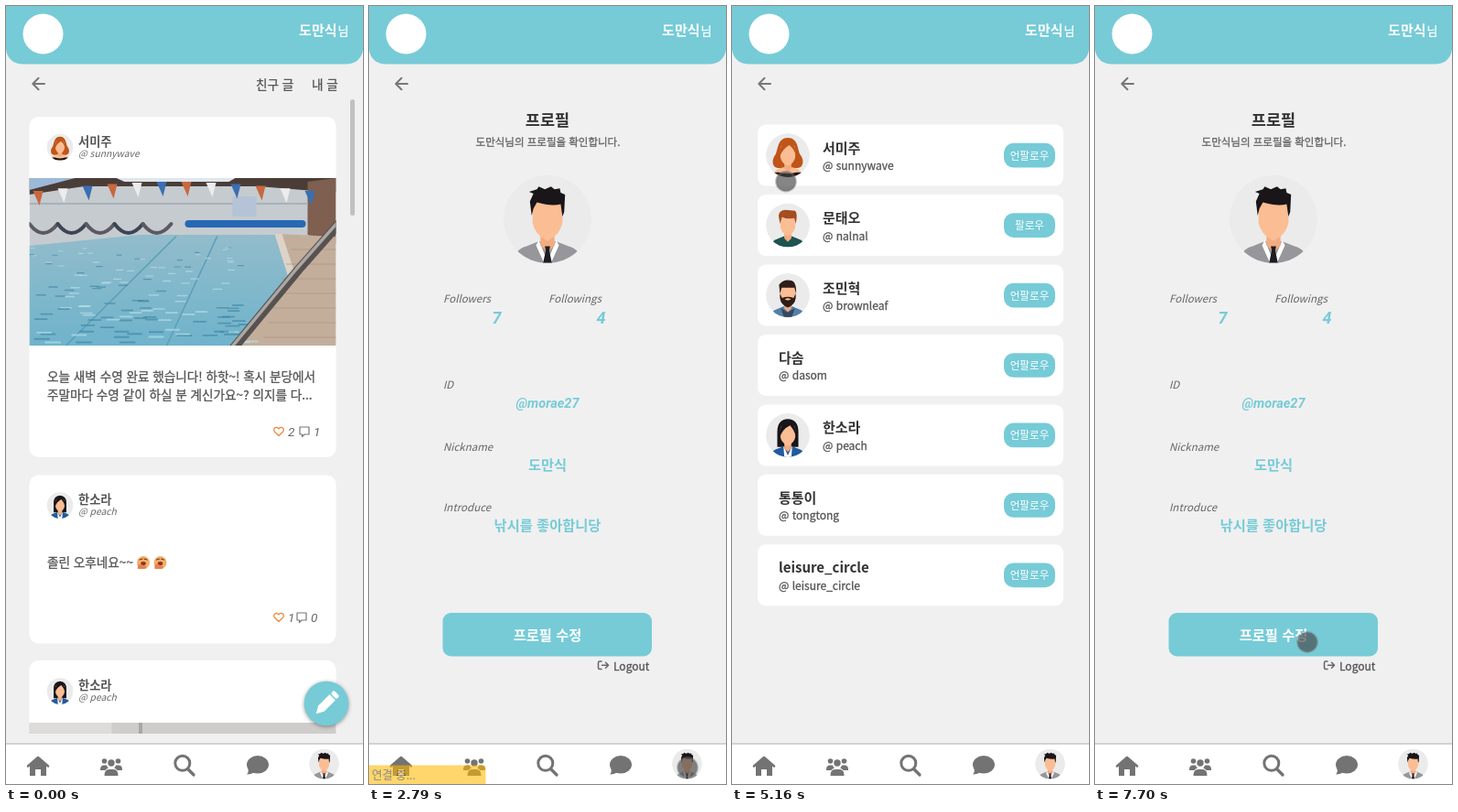
Recreate the animation shown at these times as an HTML page. Size 390 px wide and 850 px high, loop 8000 ms.

```html
<!DOCTYPE html>
<html lang="ko">
<head>
<meta charset="utf-8">
<style>
html, body { margin: 0; height: 100%; overflow: hidden; background: #f0f0f0; }
svg { display: block; width: 390px; height: 850px; font-family: "Noto Sans CJK KR", "Noto Sans KR", sans-serif; }
.num { font-family: Roboto, sans-serif; font-style: italic; }
.b { font-weight: 700; }
.m { stroke-width: .3; }
.i { font-style: italic; }
.mid { text-anchor: middle; }
.end { text-anchor: end; }
text:not(.m) { stroke: none; }
#fab { filter: drop-shadow(0 1px 2px #0006); }
</style>
</head>
<body>
<svg id="app" viewBox="0 0 390 850"></svg>
<script>
const TEAL = '#76cbd7', SKIN = '#fbbd93', LOOP = 8000;
const ME = '도만식';

// Class m thickens regular text to a medium weight
const text = (x, y, size, fill, str, cls = 'm') =>
  `<text x="${x}" y="${y}" font-size="${size}" fill="${fill}" stroke="${fill}" class="${cls}">${str}</text>`;
const rect = (x, y, w, h, fill, r = 0) =>
  `<rect x="${x}" y="${y}" width="${w}" height="${h}" rx="${r}" fill="${fill}"/>`;
const path = (d, fill) => `<path d="${d}" fill="${fill}"/>`;
const line = (d, color, w = 2) =>
  `<path d="${d}" fill="none" stroke="${color}" stroke-width="${w}" stroke-linecap="round" stroke-linejoin="round"/>`;
const disc = (x, y, r, fill) => `<circle cx="${x}" cy="${y}" r="${r}" fill="${fill}"/>`;

// Flat portraits inside a circle of radius 50
const neck = path('M-8 10H8V30L0 38L-8 30z', '#f3ab80');
const head = path('M-17 -14Q-17 -26 0 -26T17 -14V4Q15 17 0 25Q-15 17 -17 4z', SKIN);
const body = color => path('M-39 50Q-38 35 -24 31L-9 25L0 34L9 25L24 31Q38 35 39 50z', color);
const looks = {
  suit: body('#97979b') + path('M-10 24L0 48L10 24L13 30L4 50H-4L-13 30z', '#fff') + neck +
    path('M-3 31H3L2 36L5 50H-5L-2 36z', '#1d1d22') + head +
    path('M-18 -4L-20 -20L-16 -29L-21 -31L-12 -34L-10 -37L-3 -34L4 -37L8 -34L14 -35L15 -30L20 -28L19 -8L17 -3L15 -17Q5 -14 -12 -19L-16 -12z', '#191518'),
  red: path('M0 -40C-24 -40 -22 -12 -28 -2C-38 10 -36 28 -22 29H22C36 28 38 10 28 -2C22 -12 24 -40 0 -40z', '#bf5518') +
    path('M-36 46Q-30 31 -8 27H8Q30 31 36 46z', SKIN) + neck + head +
    path('M-18 2Q-20 -29 0 -29T18 2Q16 -14 3 -23Q-12 -14 -18 2z', '#bf5518') +
    path('M-42 50Q-35 37 -20 39Q0 45 20 39Q35 37 42 50z', '#171114'),
  black: path('M0 -37Q-24 -36 -24 -8V27H24V-8Q24 -36 0 -37z', '#17151a') + body('#225a9c') +
    path('M-10 24L0 46L10 24L8 50H-8z', '#fff') + neck + head +
    path('M-19 6Q-20 -30 0 -30T19 6Q16 -10 5 -22Q-12 -14 -19 6z', '#17151a'),
  green: body('#1d5350') + neck + head +
    path('M-18 -3L-21 -22Q-20 -34 -5 -35L17 -33Q23 -25 18 -3L15 -16Q-2 -13 -13 -19z', '#a34d20'),
  beard: body('#557fa8') + path('M-16 29L0 39L16 29L9 50H-9z', '#34495f') + neck + head +
    path('M-18 -4V6Q-16 22 0 28Q16 22 18 6V-4L13 6Q0 1 -13 6z', '#2e1d19') +
    path('M-7 9Q0 5 7 9Q0 14 -7 9z', SKIN) +
    path('M-18 -3L-20 -24Q-10 -37 5 -34Q20 -34 19 -3L15 -17H-14z', '#2e1d19')
};
const avatar = (x, y, r, look) =>
  `<g transform="translate(${x} ${y}) scale(${r / 50})" clip-path="url(#round)">${disc(0, 0, 50, '#ebebeb')}${looks[look]}</g>`;

function pool() {
  let seed = 7;
  const rnd = () => (seed = seed * 16807 % 2147483647) / 2147483647;
  let s = rect(0, 0, 335, 183, '#c5cbcf') + path('M0 0H335V16L250 9H60L0 18z', '#4a3d37') +
    path('M0 0H50L0 13z', '#9db9d8') + path('M95 0H225L218 4H104z', '#dfe6ee') +
    path('M304 4L335 0V72L304 62z', '#7e5f50') + rect(0, 27, 304, 2, '#a9b1b8') +
    rect(222, 20, 26, 22, '#b4c4d6') + rect(170, 46, 132, 8, '#2668b4', 4) +
    path('M0 74L120 62H272L284 110L238 183H0z', 'url(#water)') +
    path('M272 61L335 64V183H232L284 110z', '#c3ae9c') + path('M268 61H276L290 104L284 112z', '#ddd3c8');
  for (let i = 0; i < 12; i++) {
    const x = 4 + i * 27, y = 14 - 10 * Math.sin(i / 11 * 3.14);
    s += path(`M${x} ${y}h11l-4 16z`, ['#c9673f', '#ececec', '#3a6fb2'][i % 3]);
  }
  for (let i = 0; i < 5; i++)
    s += line(`M${i * 31} 50q15 20 31 0`, i % 2 ? '#3f4455' : '#5c5963', 4);
  s += line('M40 183L160 64M150 183L205 64', '#5b9fb8', 1.5);
  for (let i = 0; i < 130; i++) {
    const k = rnd(), y = 76 + k * 104, x = rnd() * 235;
    s += line(`M${x.toFixed(1)} ${y.toFixed(1)}h${(4 + 12 * k).toFixed(1)}`, i % 2 ? '#b9e0eaaa' : '#3f87a5aa', 1 + k);
  }
  for (let i = 0; i < 7; i++) s += line(`M${286 - i * 5} ${78 + i * 16}H335`, '#a8947f', .7);
  return `<g transform="translate(25.5 188)" clip-path="url(#photo)">${s}` +
    line('M340 48L294 100L222 187', '#57524f', 10) + line('M338 47L292 99L220 186', '#aaa7a4', 3.5) + '</g>';
}

const author = (y, name, id, look) => avatar(59, y, 14.5, look) +
  text(79, y - 1.8, 13.2, '#555', name, 'b') + text(79, y + 10.8, 10.3, '#666', '@ ' + id, 'i');
const counts = (y, likes, notes, x1, x2) =>
  line(`M298 ${y + 4.5}l-4.5 -4.3c-2.6 -3.2 1.7 -7 4.5 -3.3c2.8 -3.7 7.1 .1 4.5 3.3z`, '#ee8a3c', 1.3) +
  text(308, y + 5, 13.6, '#666', likes, 'num') +
  line(`M${x1} ${y - 5}h10v8h-5l-2.5 2.5v-2.5h-2.5z`, '#777', 1.2) + text(x2, y + 5, 13.6, '#666', notes, 'num');
const yawn = x => disc(x, 608, 7, '#f4b06a') + line(`M${x - 4} 605l3 -1M${x + 4} 605l-3 -1`, '#5c2b18', 1) +
  `<ellipse cx="${x}" cy="609" rx="2.8" ry="2" fill="#8e3428"/>` +
  path(`M${x - 6} 615q-1 -6 3 -5l6 2q1 3 -2 3z`, '#e58350');

const home = text(273, 91, 13.6, '#555', '친구 글') + text(334, 91, 13.6, '#555', '내 글') +
  rect(376, 102, 5, 127, '#c1c1c1', 2.5) +
  rect(25.5, 121, 335, 372, '#fff', 10) + author(154.3, '서미주', 'sunnywave', 'red') + pool() +
  text(45, 410, 13.6, '#555', '오늘 새벽 수영 완료 했습니다! 하핫~! 혹시 분당에서') +
  text(45, 430, 13.6, '#555', '주말마다 수영 같이 하실 분 계신가요~? 의지를 다...') + counts(465, 2, 1, 321, 336) +
  rect(25.5, 512.5, 335, 184, '#fff', 10) + author(545.5, '한소라', 'peach', 'black') +
  text(45, 613, 13.6, '#555', '졸린 오후네요~~') + yawn(150) + yawn(168.5) + counts(668, 1, 0, 318, 333) +
  rect(25.5, 715, 335, 100, '#fff', 10) + author(748.5, '한소라', 'peach', 'black') +
  rect(25.5, 783, 335, 12, '#cfcdcb') + rect(25.5, 783, 90, 12, '#dddcda') + rect(145, 783, 4, 12, '#aaa8a6') +
  rect(0, 795, 390, 11, '#f0f0f0') +
  `<g id="fab">${disc(350, 762, 24.3, TEAL)}</g><g transform="translate(350 762) rotate(45)">` +
  rect(-4.5, -16, 9, 5, '#fff', 2) + path('M-4.5 -9.5H4.5V8L0 16L-4.5 8z', '#fff') + '</g>';

const profile = text(195, 130.5, 17.5, '#333', '프로필', 'b mid') +
  text(195.5, 153, 11.5, '#666', ME + '님의 프로필을 확인합니다.', 'm mid') + avatar(195, 232.8, 48, 'suit') +
  [[81, 324, 'Followers'], [196, 324, 'Followings'], [81, 418, 'ID'], [81, 486, 'Nickname'], [81, 552, 'Introduce']]
    .map(([x, y, s]) => text(x, y, 11.5, '#666', s, 'i')).join('') +
  text(134.5, 347, 18, TEAL, 7, 'num b') + text(248.5, 347, 18, TEAL, 4, 'num b') +
  text(195, 439, 14.5, TEAL, '@morae27', 'num b mid') + text(195, 506.5, 15.3, TEAL, ME, 'b mid') +
  text(195, 572.5, 15.3, TEAL, '낚시를 좋아합니당', 'b mid') +
  rect(80.5, 663, 228.5, 47.5, TEAL, 9) + text(195, 692.5, 15.3, '#fff', '프로필 수정', 'b mid') +
  line('M254 716h-2q-1.5 0 -1.5 1.5v5.5q0 1.5 1.5 1.5h2M254.5 720.3h6.5M258.5 717.3l3 3l-3 3', '#666', 1.5) +
  text(267, 725.5, 12, '#555', 'Logout');

const people = [
  ['서미주', 'sunnywave', 'red'], ['문태오', 'nalnal', 'green'], ['조민혁', 'brownleaf', 'beard'],
  ['다솜', 'dasom'], ['한소라', 'peach', 'black'], ['통통이', 'tongtong'], ['leisure_circle', 'leisure_circle']
];
const list = people.map(([name, id, look], i) => {
  const y = 129.6 + 76.45 * i, x = look ? 99 : 51;
  return rect(28, y, 334, 67, '#fff', 9) + (look ? avatar(61, y + 33.5, 24, look) : '') +
    text(x, y + 31, 15, '#333', name, 'b') + text(x, y + 49.5, 12, '#555', '@ ' + id) +
    rect(297, y + 20.2, 56, 26.7, TEAL, 10.5) +
    text(325, y + 38, 11.6, '#fff', i == 1 ? '팔로우' : '언팔로우', 'mid');
}).join('');

const G = '#737373';
const chrome = path('M0 0H390V48Q387 63.500 371 63.500H19Q3 63.500 0 48z', TEAL) + disc(40.5, 30.5, 22, '#fff') +
  text(361.5, 32, 15, '#fff', ME, 'b end') + text(374.5, 31.5, 13, '#fff', '님', 'm end') +
  line('M42 85H29.5M35.5 78.8L29.3 85L35.5 91.2', '#777') +
  rect(0, 805, 390, 45, '#fff') + rect(0, 805, 390, 2, '#d2d2d2') +
  line('M24 830.5L35 821L46 830.5', G, 2.6) + path('M26 830L35 821.5L44 830V841H38V834H32V841H26z', G) +
  disc(107.5, 825, 2.8, G) + disc(122.5, 825, 2.8, G) + disc(115, 827, 3.7, G) +
  path('M103 834q0 -4.5 4 -4.5h3q1 3 2 3q-3 1 -3.5 2.5h-5.5zM127 834q0 -4.5 -4 -4.5h-3q-1 3 -2 3q3 1 3.5 2.5h5.5zM107.5 841q0 -7 5 -7h5q5 0 5 7z', G) +
  `<circle cx="192.8" cy="827.3" r="8" fill="none" stroke="${G}" stroke-width="3"/>` + line('M199 834L205 840', G, 3.3) +
  `<ellipse cx="275" cy="828.8" rx="12" ry="9.7" fill="${G}"/>` + path('M264 832Q266 837 263 839.5Q269 839.5 272 836z', G) +
  avatar(347.5, 828, 16.5, 'suit');

const status = path('M0 829.5H124.5Q127.5 829.5 127.5 832.5V850H0z', '#ffb900') + text(3, 844.5, 12.4, '#333', '연결 중...', '');

app.innerHTML = `<defs>
<clipPath id="round"><circle r="50"/></clipPath>
<clipPath id="photo"><rect width="335" height="183"/></clipPath>
<linearGradient id="water" x2="0" y2="1"><stop stop-color="#92bccb"/><stop offset="1" stop-color="#6fb3cb"/></linearGradient>
</defs>${rect(0, 0, 390, 850, '#f0f0f0')}
<g id="home">${home}</g><g id="profile">${profile}</g><g id="list">${list}</g>
${chrome}<g id="status">${status}</g><circle id="dot" stroke-width="2.4"/>`;

const $ = id => document.getElementById(id);
const pages = [[0, 'home'], [2410, 'profile'], [4150, ''], [4350, 'list'], [5710, 'profile']];
const clicks = [[2280, 2410], [3950, 4080], [5570, 5710]];
// Pointer route: time, x, y
const route = [
  [590, 386, 848], [790, 353, 835], [1460, 353, 835], [1720, 338, 835], [1930, 348, 832], [3090, 348, 832],
  [3350, 245, 590], [3620, 141, 349], [4480, 141, 349], [4610, 139, 298], [4650, 139, 298], [4890, 208, 634],
  [5230, 21, 79], [5370, 38, 86], [5770, 38, 86], [6130, 185, 364], [6400, 350, 690], [6550, 346, 717],
  [6750, 346, 717], [6880, 340, 722], [7200, 285, 657], [7400, 230, 670], [7560, 237, 712], [7700, 232, 695], [LOOP, 232, 695]
];

function pointer(t) {
  const i = Math.max(1, route.findIndex(k => k[0] > t));
  const [a, x, y] = route[i - 1], [b, u, v] = route[i], p = (t - a) / (b - a);
  return [x + (u - x) * p, y + (v - y) * p];
}

function draw(now) {
  const t = now % LOOP;
  const page = pages.filter(p => p[0] <= t).pop()[1];
  for (const id of ['home', 'profile', 'list']) $(id).style.display = id == page ? '' : 'none';

  const fade = (on, off) => t < on ? 0 : Math.min(1, Math.max(0, (off - t) / 120));
  $('status').style.opacity = t < 5000 ? fade(2410, 2860) : fade(5710, 6200);

  const dot = $('dot'), [x, y] = pointer(t), down = clicks.some(([a, b]) => t >= a && t < b);
  dot.style.display = t < 590 ? 'none' : '';
  dot.setAttribute('cx', x);
  dot.setAttribute('cy', y);
  dot.setAttribute('r', down ? 12.5 : 10.7);
  dot.setAttribute('fill', down ? 'rgba(196,184,8,.8)' : 'rgba(66,66,66,.64)');
  dot.setAttribute('stroke', down ? 'rgba(170,158,0,.6)' : 'rgba(115,115,115,.42)');
  requestAnimationFrame(draw);
}
requestAnimationFrame(draw);
</script>
</body>
</html>
```
